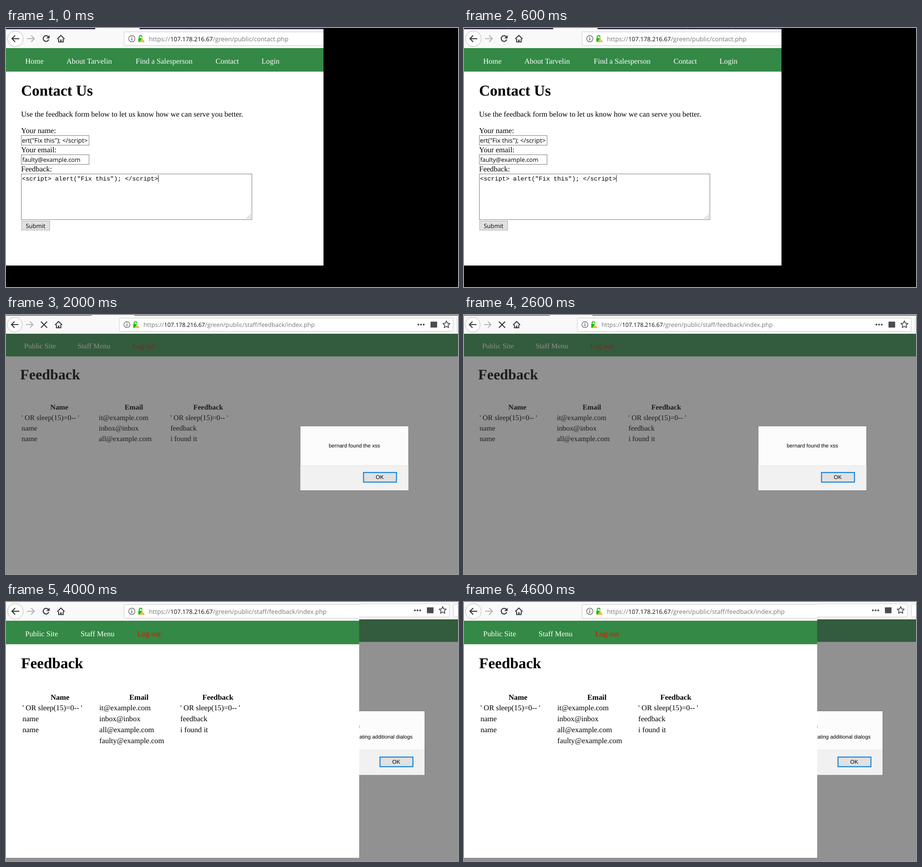
Animation, 988 px wide and 567 px high, one loop 5 s. Source, as an HTML page:

```html
<!DOCTYPE html>
<html lang="en">
<head>
<meta charset="utf-8">
<title>Feedback form walkthrough</title>
<style>
  html, body { margin: 0; width: 100%; height: 100%; overflow: hidden; background: #000; }
  svg { display: block; }
  text { text-rendering: geometricPrecision; white-space: pre; }
  .serif { font-family: "Liberation Serif", "Times New Roman", serif; }
  .ui { font-family: "Open Sans", "Noto Sans", sans-serif; }
  .mono { font-family: "Liberation Mono", "Courier New", monospace; }
  .sans { font-family: "Liberation Sans", Arial, sans-serif; }
</style>
</head>
<body>
<svg id="stage" width="988" height="567" viewBox="0 0 988 567"></svg>
<script>
const NAV_TOP = 44;
const BODY = 16.45;
const STEP_MS = 1000;

const esc = s => s.replace(/&/g, "&amp;").replace(/</g, "&lt;").replace(/>/g, "&gt;");

const text = (str, x, y, { font = "serif", size = BODY, fill = "#000", anchor = "start", bold } = {}) =>
  `<text class="${font}" x="${x}" y="${y}" font-size="${size}" fill="${fill}" ` +
  `text-anchor="${anchor}"${bold ? ' font-weight="700"' : ""}>${esc(str)}</text>`;

const rect = (x, y, w, h, fill, stroke = "none", sw = 1, r = 0) =>
  `<rect x="${x}" y="${y}" width="${w}" height="${h}" rx="${r}" fill="${fill}" stroke="${stroke}" stroke-width="${sw}"/>`;

const line = (d, stroke, sw, extra = "") =>
  `<path d="${d}" fill="none" stroke="${stroke}" stroke-width="${sw}" ${extra}/>`;

const shape = (d, fill) => `<path d="${d}" fill="${fill}"/>`;
const dot = (x, y, r, fill) => `<circle cx="${x}" cy="${y}" r="${r}" fill="${fill}"/>`;

function star(cx, cy, r) {
  const pts = Array.from({ length: 10 }, (_, i) => {
    const a = -Math.PI / 2 + i * Math.PI / 5, q = i % 2 ? r * 0.48 : r;
    return `${(cx + q * Math.cos(a)).toFixed(2)},${(cy + q * Math.sin(a)).toFixed(2)}`;
  });
  return `<polygon points="${pts.join(" ")}" fill="none" stroke="#4a4a4f" stroke-width="1.8" stroke-linejoin="round"/>`;
}

function tabStrip() {
  const dark = "#1b1738";
  const seams = [97.5, 390, 487.5, 585, 683].map(x => rect(x - 0.5, 0, 1, 2.5, "#55526c")).join("");
  return rect(-5, -10, 200, 12.5, dark) + rect(292, -10, 800, 12.5, dark) + seams;
}

function toolbar(path, loading) {
  const ink = "#38383d";
  const reload = loading
    ? line("M80 16.5L94 30.5M94 16.5L80 30.5", ink, 2.3)
    : line("M93.4 25.2A6.2 6.2 0 1 1 92 18.8", ink, 2.2) + shape("M95.3 15.5v7.2h-7.2z", ink);
  return rect(-5, -10, 1100, 54, "#f9f9fa") + tabStrip() +
    `<circle cx="20.5" cy="23.5" r="17" fill="#fff" stroke="#b4b4b6"/>` +
    line("M13 23.3H29M20 16.2L13 23.3L20 30.4", ink, 2.2) +
    line("M46 23.3H62M55 16.2L62 23.3L55 30.4", "#b3b3b5", 2.1) +
    reload +
    line("M112 24L120 16.2L128 24", ink, 2.1) +
    line("M115 23.5V30.5H125V23.5", ink, 2.1) + rect(118.5, 25.5, 3, 5, ink) +
    rect(258, 8.5, 757, 30, "#fff", "#c8c8ca", 1, 2) +
    rect(1023.7, 8.5, 80, 30, "#fff", "#c8c8ca", 1, 2) +
    `<circle cx="275" cy="23.3" r="6.9" fill="none" stroke="#5b5b60" stroke-width="1.3"/>` +
    rect(274.2, 22.2, 1.7, 5, "#5b5b60") + dot(275, 19.8, 1.1, "#5b5b60") +
    rect(289.3, 22.3, 10, 8.2, "#12bc00", "none", 0, 1) +
    line("M291.3 22.5V19.3A2.9 2.9 0 0 1 297.1 19.3V20.5", "#12bc00", 2) +
    `<path d="M298 22.3L303.8 31.3H292.2Z" fill="#ffa400" stroke="#fff" stroke-width=".7"/>` +
    rect(297.4, 25, 1.2, 3.2, "#fff") + rect(297.4, 29, 1.2, 1.2, "#fff") +
    text("https://", 312.5, 28.5, { font: "ui", size: 13.6, fill: "#777" }) +
    text("107.178.216.67", 359.3, 28.5, { font: "ui", size: 13.1, fill: "#0c0c0d" }) +
    text(path, 452.3, 28.5, { font: "ui", size: 13.6, fill: "#777" }) +
    [936, 942, 948].map(x => dot(x, 23.3, 2.1, "#4a4a4f")).join("") +
    rect(963.5, 16.5, 15, 13.5, "#4a4a4f") +
    star(999.5, 23.3, 8.4);
}

const navBar = items => rect(-5, NAV_TOP, 1100, 51.5, "#338945") +
  items.map(([label, x, fill = "#fff"]) => text(label, x, 77.5, { fill })).join("");

const heading = str => text(str, 33, 148, { size: 33, bold: true });

const publicNav = () => navBar([
  ["Home", 42], ["About Tarvelin", 132], ["Find a Salesperson", 283.5], ["Contact", 458], ["Login", 558.5]
]);
const staffNav = () => navBar([["Public Site", 42], ["Staff Menu", 163], ["Log out", 287, "#f00"]]);

function grip() {
  let out = "";
  for (let row = 0; row < 3; row++)
    for (let col = 2 - row; col < 3; col++)
      out += rect(526 + col * 3.5, 408 + row * 3.5, 2, 2, "#b5b5b5");
  return out;
}

function contactForm() {
  const edge = "#7a7a7a", script = '<script> alert("Fix this"); <\/script>';
  return heading("Contact Us") +
    text("Use the feedback form below to let us know how we can serve you better.", 33, 193.5) +
    text("Your name:", 33, 230) + rect(33.5, 235.5, 148, 21, "#fff", edge) +
    `<svg x="35" y="236" width="145" height="20">` +
    text(script, 143.5, 15, { font: "ui", size: 13.6, anchor: "end" }) + `</svg>` +
    text("Your email:", 33, 272) + rect(33.5, 277.5, 148, 21, "#fff", edge) +
    text("faulty@example.com", 35.5, 293, { font: "ui", size: 13 }) +
    text("Feedback:", 33, 314) + rect(33.5, 319.5, 504, 100, "#fff", edge) +
    text(script, 35, 333.5, { font: "mono", size: 13.4 }) +
    rect(332.5, 322, 1, 15, "#000") + grip() +
    rect(34, 422.5, 61.5, 20, "#e1e1e1", "#adadad") +
    text("Submit", 43.3, 437.8, { font: "ui", size: 12.9 });
}

const thanks = () => heading("Feedback Received") +
  text("Thank you for submitting feedback. We hope to be able to use it to serve you", 33, 193.5) +
  text("better.", 33, 213.5);

function feedbackTable(cols, centers, extra = []) {
  const probe = "' OR sleep(15)=0-- '";
  const rows = [
    [probe, "it@example.com", probe],
    ["name", "inbox@inbox", "feedback"],
    ["name", "all@example.com", "i found it"],
    ...extra
  ];
  return heading("Feedback") +
    ["Name", "Email", "Feedback"].map((h, i) =>
      text(h, centers[i], 216.5, { anchor: "middle", bold: true })).join("") +
    rows.map((row, r) => row.map((cell, c) =>
      text(cell, cols[c], 240.3 + r * 23.9)).join("")).join("");
}

// The browser is laid out once; each shot only shifts and scales it.
function shot({ w = 988, h = 567, k = 1, dx = 0, top = NAV_TOP, path, loading, body, over = "" }) {
  return `<svg width="${w}" height="${h}">` + rect(0, 0, w, h, "#fff") +
    `<g transform="translate(${dx} ${top - NAV_TOP * k}) scale(${k})">${toolbar(path, loading)}${body}</g>` +
    over + `</svg>`;
}

const dim = top => rect(0, top, 988, 567 - top, "rgba(52,52,54,.54)");

const dialog = (x, y, w, h, split, okX, okY, body) =>
  rect(x - 0.5, y - 0.5, w + 1, h + 1, "#fcfcfc", "#77777a") +
  rect(x, split, w, y + h - split, "#f1f1f1") + rect(x, split - 0.5, w, 1, "#e2e2e2") +
  rect(okX + 1, okY + 1, 72, 21, "#e1e1e1", "#0078d7", 2) +
  text("OK", okX + 36.5, okY + 15.6, { font: "sans", size: 12, anchor: "middle" }) + body;

const staffPath = "/green/public/staff/feedback/index.php";
const small = { font: "sans", size: 11.6 };
const narrow = [[36, 211.4, 373.7], [121.6, 290.7, 459.3]];

const shots = {
  form: shot({
    w: 694, h: 520, path: "/green/public/contact.php", body: publicNav() + contactForm()
  }),
  received: shot({
    w: 728, h: 395, path: "/green/public/feedback_received.php", body: publicNav() + thanks()
  }),
  firstAlert: shot({
    k: 0.9638, dx: -0.7, top: 41, path: staffPath, loading: true,
    body: staffNav() + feedbackTable(...narrow),
    over: dim(41) + dialog(643.5, 243.5, 236, 140.5, 330, 780.5, 343.8,
      text("bernard found the xss", 761.5, 290, { ...small, anchor: "middle" }))
  }),
  secondAlert: shot({
    k: 0.957, dx: -2, top: 38, path: staffPath, loading: true,
    body: staffNav() + feedbackTable(...narrow),
    over: dim(38) + dialog(595.5, 239, 319.5, 139.5, 324, 816.5, 338.5,
      text("Fix this", 755, 274.7, { ...small, size: 11.45, anchor: "middle" }) +
      rect(623, 288.7, 11.5, 11.5, "#fff", "#333") +
      text("Prevent this page from creating additional dialogs", 638.3, 298.5, { ...small, size: 11.45 }))
  }),
  result: shot({
    w: 772, h: 560, top: 41, path: staffPath,
    body: staffNav() + feedbackTable([36, 204, 381], [118, 290.5, 463], [["", "faulty@example.com", ""]])
  })
};

const steps = [["form"], ["form", "received"], ["firstAlert"], ["secondAlert"], ["secondAlert", "result"]];

const stage = document.getElementById("stage");
stage.innerHTML = Object.entries(shots).map(([id, svg]) => `<g id="${id}">${svg}</g>`).join("");
const layers = Object.keys(shots).map(id => document.getElementById(id));

let current = -1;
function tick() {
  const step = Math.floor(performance.now() / STEP_MS) % steps.length;
  if (step !== current) {
    current = step;
    for (const g of layers) g.style.display = steps[step].includes(g.id) ? "" : "none";
  }
  requestAnimationFrame(tick);
}
tick();
</script>
</body>
</html>
```
